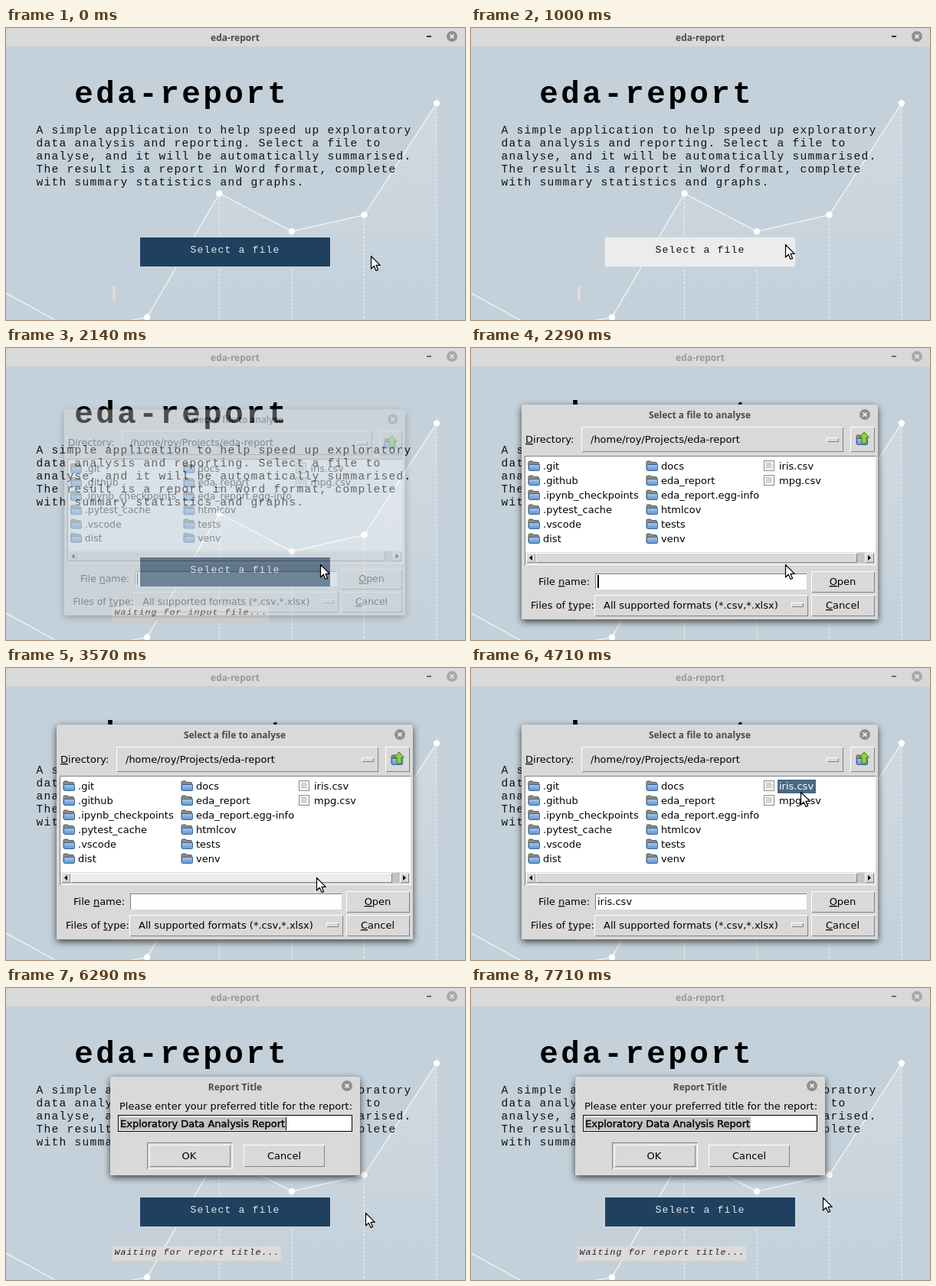
These frames come from a looping animation (599x382 px, 8000 ms). An HTML page:

```html
<!DOCTYPE html>
<html lang="en">
<head>
<meta charset="utf-8">
<title>eda-report</title>
<style>
  html, body { margin: 0; width: 100%; height: 100%; overflow: hidden; background: #c4d1da; }
  svg { display: block; width: 100vw; height: 100vh; }
  text { font: 13px "DejaVu Sans", sans-serif; white-space: pre; }
  .mono { font-family: "Liberation Mono", monospace; }
  .bar { font: 700 12px "Open Sans", sans-serif; fill: #4b4b4b; text-anchor: middle; }
  .mid { text-anchor: middle; }
  rect, .bevel { shape-rendering: crispEdges; }
</style>
</head>
<body>
<svg id="stage" viewBox="0 0 599 382"></svg>
<script>
const FPS = 7, LOOP = 8000;
const GREY = '#d9d9d9', HOVER = '#ececec', DARK = '#828282', NAVY = '#1f405f';

// Markup helpers
const rect = (x, y, w, h, fill, more = '') =>
  `<rect x="${x}" y="${y}" width="${w}" height="${h}" fill="${fill}" ${more}/>`;
const text = (x, y, s, more = '') => `<text x="${x}" y="${y}" ${more}>${s}</text>`;
const group = (id, inner, more = '') => `<g id="${id}" ${more}>${inner}</g>`;
const key = c => `<tspan text-decoration="underline">${c}</tspan>`;

// Low, airy monospace: letters sit centred in cells of the given pitch
function mono(x, y, s, pitch, style = '', more = '') {
  const size = pitch * 1.46, gap = pitch - size * .6;
  return text(x + gap / 2, y, s,
    `class="mono" style="font-size:${size}px;letter-spacing:${gap}px;${style}" ${more}`);
}

function bevel(x, y, w, h, fill = GREY, sunken = false, id = '') {
  const [a, b] = sunken ? [DARK, '#fff'] : ['#fff', DARK];
  const edge = (d, c) => `<path class="bevel" d="${d}" fill="none" stroke="${c}"/>`;
  const l = x + .5, t = y + .5, r = x + w - .5, u = y + h - .5;
  return rect(x, y, w, h, fill, id && `id="${id}"`) +
    edge(`M${l} ${u}V${t}H${r}`, a) + edge(`M${l} ${u}H${r}V${t}`, b);
}

const closeButton = (x, y) =>
  `<circle cx="${x}" cy="${y}" r="7" fill="#8f8f8f"/>
   <path d="M${x - 2.5} ${y - 2.5}l5 5m0 -5l-5 5" stroke="#f4f4f4" stroke-width="1.7"/>`;

const folder = (x, y) =>
  `<g transform="translate(${x} ${y})">
    <path d="M1 2.5Q1 1 2.5 1H6.5L8 2.5H13.5Q14.5 2.5 14.5 4V12H1Z" fill="#8b8b80" stroke="#5c5c55"/>
    <path d="M1.5 5.5H15.5V12.5Q15.5 13.5 14.5 13.5H2.5Q1.5 13.5 1.5 12.5Z" fill="url(#blue)" stroke="#3a659c"/>
  </g>`;

const page = (x, y) =>
  rect(x + .5, y + .5, 13, 13, '#f4f4f2', 'stroke="#8d8d8a"') +
  `<path class="bevel" d="M${x + 3} ${y + 3.5}h7m-7 2h8m-8 2h7m-7 2h8" stroke="#b5b5b2"/>`;

const dialog = (x, y, w, h, title, closeX, closeY) =>
  `<path d="M${x} ${y + h}V${y + 4}q0 -4 4 -4H${x + w - 4}q4 0 4 4V${y + h}Z" fill="${GREY}" filter="url(#shadow)"/>` +
  text(x + w / 2, y + 18, title, 'class="bar"') + closeButton(closeX, closeY);

function backdrop() {
  const pts = [[-5, 344], [89.5, 396], [184, 378.5], [278.5, 216.5], [373, 266], [467.5, 244.5], [562, 98.5]];
  const line = 'M' + pts.join('L');
  const marks = pts.slice(2).map(([x, y]) =>
    `<path d="M${x} ${y}V382" stroke="#fff" stroke-opacity=".75" stroke-dasharray="3 2.5"/>
     <circle cx="${x}" cy="${y}" r="4.2" fill="#fff"/>`).join('');
  return rect(0, 24, 599, 358, '#c4d1da') +
    `<path d="${line}V400H-5Z" fill="url(#area)"/>
     <path d="${line}" fill="none" stroke="#fff" stroke-opacity=".85" stroke-width="1.2"/>` + marks;
}

function mainWindow() {
  const intro = ['A simple application to help speed up exploratory',
    'data analysis and reporting. Select a file to',
    'analyse, and it will be automatically summarised.',
    'The result is a report in Word format, complete',
    'with summary statistics and graphs.'];
  return backdrop() + rect(0, 0, 599, 24, GREY) +
    text(299, 17, 'eda-report', 'class="bar" id="title"') +
    group('controls', rect(549, 10, 6, 2, '#333') + closeButton(582, 11)) +
    mono(87.5, 98, 'eda-report', 28, 'font-weight:bold') +
    intro.map((s, i) => mono(39, 138 + 17 * i, s, 10, '', 'fill="#111"')).join('') +
    rect(174.5, 273.5, 249, 39, NAVY, 'id="pick" stroke="#d0d8df"') +
    mono(240, 294, 'Select a file', 9, '', 'id="pickText"') +
    rect(139, 338, 4, 19, '#dcdada', 'id="statusBox"') +
    mono(141, 349, '', 8, 'font-style:italic', 'id="status" fill="#222"');
}

function fileDialog() {
  const rows = [['.git', '.github', '.ipynb_checkpoints', '.pytest_cache', '.vscode', 'dist'],
    ['docs', 'eda_report', 'eda_report.egg-info', 'htmlcov', 'tests', 'venv']];
  const folders = rows.map((names, c) => names.map((s, r) =>
    folder(74 + 154 * c, 147 + 19 * r) + text(94 + 154 * c, 159 + 19 * r, s)).join('')).join('');
  const upIcon = folder(502, 113) +
    `<path d="M513 110l6.5 7h-3.5v8h-6v-8h-3.5Z" fill="#8fd13f" stroke="#3d7a12"/>`;
  return dialog(66, 74, 465, 281, 'Select a file to analyse', 514, 87) +
    text(71, 124, key('D') + 'irectory:') +
    bevel(144, 103, 342, 33) + text(156, 124, '/home/roy/Projects/eda-report') + bevel(464, 117, 16, 6) +
    bevel(495, 103, 32, 33) + upIcon +
    bevel(70, 141, 458, 143, GREY, true) + rect(71, 142, 456, 125, '#fff') + folders +
    page(382, 147) + page(382, 166) +
    rect(400, 146, 50, 18, '#4a6984', 'id="mark"') +
    text(402, 159, 'iris.csv', 'id="iris"') + text(402, 178, 'mpg.csv') +
    rect(72, 268, 454, 13, '#c3c3c3') +
    bevel(72, 268, 12, 13) + bevel(514, 268, 12, 13) + bevel(84, 268, 420, 13, GREY, false, 'slider') +
    '<path d="M80 271v7l-4 -3.5ZM518 271v7l4 -3.5Z"/>' +
    text(88, 310, 'File ' + key('n') + 'ame:') + bevel(162, 295, 276, 21, '#fff', true) +
    text(165, 310, 'iris.csv', 'id="fileName"') + rect(165, 297, 1.5, 17, '#000', 'id="fileCaret"') +
    text(78, 341, 'Files of ' + key('t') + 'ype:') + bevel(161, 323, 279, 28) +
    text(173, 341, 'All supported formats (*.csv,*.xlsx)') + bevel(418, 333, 16, 6) +
    bevel(444, 292, 83, 28, GREY, false, 'open') +
    rect(445.5, 293.5, 80, 25, 'none', 'id="ring" stroke="#000" stroke-dasharray="1 1"') +
    text(485, 310, key('O') + 'pen', 'class="mid"') +
    bevel(444, 323, 83, 28) + text(485, 341, key('C') + 'ancel', 'class="mid"');
}

function titleDialog() {
  return dialog(136, 116, 326, 129, 'Report Title', 445, 128) +
    text(148, 159, 'Please enter your preferred title for the report:') +
    rect(146.5, 166.5, 305, 21, '#fff', 'stroke="#000"') +
    rect(148, 169, 217, 17, '#c3c3c3') +
    text(149, 182, 'Exploratory Data Analysis Report', 'stroke="#000" stroke-width=".4"') +
    rect(364.5, 169, 1.5, 17, '#000', 'id="titleCaret"') +
    bevel(184, 202, 112, 35, GREY, true) + bevel(187, 205, 106, 29) + text(239, 224, 'OK', 'class="mid"') +
    bevel(310, 205, 106, 29) + text(363, 224, 'Cancel', 'class="mid"');
}

stage.innerHTML = `<defs>
  <linearGradient id="area" x2="0" y2="1"><stop stop-color="#d0d9e2"/><stop offset=".94" stop-color="#c4d1da"/></linearGradient>
  <linearGradient id="blue" x2="0" y2="1"><stop stop-color="#a9c8ea"/><stop offset="1" stop-color="#5f93d0"/></linearGradient>
  <filter id="shadow" x="-15%" y="-20%" width="130%" height="145%">
    <feDropShadow dx="0" dy="3" stdDeviation="5" flood-opacity=".7"/></filter></defs>` +
  mainWindow() + group('files', fileDialog()) + group('report', titleDialog()) +
  group('cursor', '<path d="M.5 -.5V16L4.3 12.3L7 18.5L9.6 17.4L7 11.3H12.3Z" fill="#fff" stroke="#000" stroke-width="1.2" stroke-linejoin="round"/>');

const $ = id => document.getElementById(id);
const set = (id, name, value) => $(id).setAttribute(name, value);
const show = (id, on) => set(id, 'visibility', on ? 'inherit' : 'hidden');
const within = (n, ...spans) => spans.some(([a, b]) => n >= a && n < b);

// Pointer stops: [step, x, y]
const stops = [[0, 476, 299], [2, 476, 299], [7, 410, 284], [24, 410, 284], [25, 405, 275], [30, 429, 158],
  [32, 429, 158], [33, 430, 163], [38, 469, 295], [47, 469, 295], [52, 459, 275], [56, 459, 275]];

function pointer(n) {
  const i = stops.findIndex(s => s[0] > n);
  const [a, ax, ay] = stops[i - 1], [b, bx, by] = stops[i];
  const p = (n - a) / (b - a), e = p * p * (3 - 2 * p);
  return [Math.round(ax + (bx - ax) * e), Math.round(ay + (by - ay) * e)];
}

function draw(ms) {
  const n = Math.min(55, Math.floor(ms * FPS / 1000 + .05));
  const [x, y] = pointer(n);
  set('cursor', 'transform', `translate(${x} ${y})`);

  const active = n < 15;
  $('title').style.fill = active ? '#4b4b4b' : '#9a9a9a';
  set('controls', 'opacity', active ? 1 : .65);

  const hot = n < 14 && x >= 175 && x < 423 && y >= 274 && y < 312;
  set('pick', 'fill', hot ? HOVER : NAVY);
  set('pickText', 'fill', hot ? '#111' : '#e4e8ec');

  const status = n < 14 ? '' : `Waiting for ${n < 44 ? 'input file' : 'report title'}...`;
  $('status').textContent = status;
  set('statusBox', 'width', 4 + 8 * status.length);

  const open = within(n, [15, 44]), opening = n === 15;
  show('files', open);
  set('files', 'opacity', opening ? .35 : 1);
  set('files', 'transform', opening ? 'translate(298.5 215) scale(.957) translate(-298.5 -214.5)' : '');
  show('fileCaret', within(n, [15, 19], [21, 25]));
  set('slider', 'fill', open && y >= 268 && y < 281 && x < 420 ? HOVER : GREY);
  const marked = within(n, [30, 43]);
  show('mark', marked);
  set('iris', 'fill', marked ? '#fff' : '#000');
  show('fileName', within(n, [30, 44]));
  set('open', 'fill', n > 30 && x >= 444 && y >= 292 ? HOVER : GREY);
  show('ring', n === 43);

  show('report', n >= 44);
  show('titleCaret', within(n, [44, 48], [50, 54]));
}

const start = performance.now();
function tick() {
  draw((performance.now() - start) % LOOP);
  requestAnimationFrame(tick);
}
tick();
</script>
</body>
</html>
```
